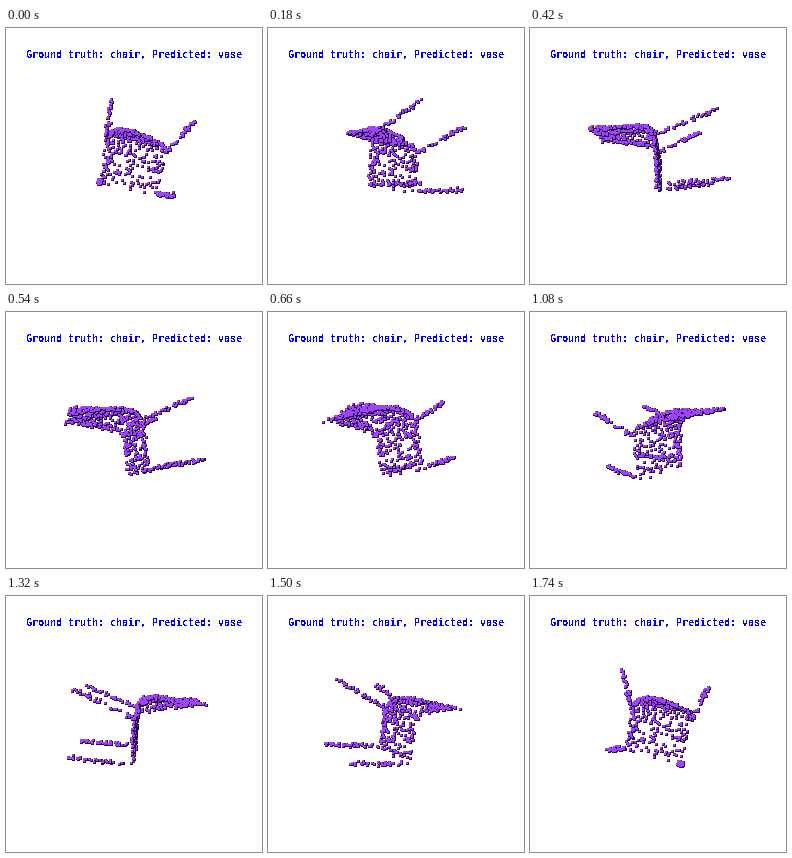
A matplotlib script that plays this animation: 256 by 256 pixels, repeating every 1800 ms.

```python
import numpy as np
import matplotlib.pyplot as plt
from matplotlib.animation import FuncAnimation

SIZE, DPI = 256, 64
FRAMES, LOOP_MS = 30, 1800
FOCAL = SIZE / 2 / np.tan(np.radians(30))  # 60 degree field of view
TILT = np.radians(12)
LENGTH, BEND = 112, 50  # seat front to top of the back, and the fold between
LAYERS = 5
PURPLE, DARK, WHITE = (160, 68, 250), (40, 14, 62), (255, 255, 255)

rng = np.random.default_rng(7)


def tilted(across, along, z):
    """Chair axes to world axes, y up."""
    c, s = np.cos(TILT), np.sin(TILT)
    return np.column_stack([across * c + along * s, along * c - across * s, z])


def shell(u, v):
    """Seat and back: u from -1 to 1 across, v along the length."""
    fold = 5 * np.log1p(np.exp((v - BEND) / 5))
    z = 0.97 * fold + 0.04 * v - 1
    half = 31.5 - 6 * ((v - BEND) / (LENGTH - BEND)) ** 2
    pts = tilted(u * half - 0.1 * z, v - 33.5 - 0.92 * fold, z + u)
    bulge = 14 * (1 - u * u) * np.sin(np.pi * v / LENGTH) ** 2
    return pts + np.outer(bulge, (-0.55, 0.83, 0.1))


def shell_points(n):
    v = LENGTH * rng.uniform(0, 1, n) ** 0.8
    return shell(rng.uniform(-1, 1, n), v) + rng.normal(0, 0.6, (n, 3))


def leg_pair(v, spread, along, z, n=45):
    """Left and right leg, splayed from the shell edge at v to the feet."""
    side = np.repeat([-1, 1], n)
    joint = shell(side, np.full(2 * n, v))
    foot = tilted(7.5 + side * spread, along, z + 4.5 * side) \
        if np.ndim(along) else tilted(7.5 + side * spread,
                                      np.full(2 * n, along), z + 4.5 * side)
    t = rng.uniform(0, 1, (2 * n, 1))
    return foot + (joint - foot) * t + rng.normal(0, 1, (2 * n, 3))


cloud = np.vstack([
    shell_points(680),
    leg_pair(47, 33.6, 38.3, -50),
    leg_pair(2, 27.5, -23, -62),
])


def project(angle):
    """Pixel positions after a turn about the vertical axis, far to near."""
    x, y, z = cloud.T
    c, s = np.cos(angle), np.sin(angle)
    depth = z * c + x * s
    scale = FOCAL / (FOCAL + depth)
    xy = np.column_stack([(x * c - z * s) * scale, -y * scale]) + SIZE / 2
    return np.round(xy[np.argsort(-depth)]).astype(int)


def stamp(img, xy, offsets, color):
    for dx in offsets:
        for dy in offsets:
            img[xy[:, 1] + dy, xy[:, 0] + dx] = color


def render(angle):
    img = np.full((SIZE, SIZE, 3), WHITE, np.uint8)
    for xy in np.array_split(project(angle), LAYERS):
        stamp(img, xy, (-1, 0, 1), DARK)
        stamp(img, xy, (-1, 0), PURPLE)
    return img


fig = plt.figure(figsize=(SIZE / DPI, SIZE / DPI), dpi=DPI, facecolor="white")
ax = fig.add_axes([0, 0, 1, 1])
ax.axis("off")
view = ax.imshow(render(0), extent=(0, SIZE, SIZE, 0), interpolation="nearest")
ax.text(20, 30, "Ground truth: chair, Predicted: vase", color="blue",
        family="DejaVu Sans Mono", weight="bold", size=10 * 72 / DPI,
        va="baseline", antialiased=False)


def draw(i):
    view.set_data(render(2 * np.pi * i / FRAMES))
    return [view]


anim = FuncAnimation(fig, draw, frames=FRAMES, interval=LOOP_MS / FRAMES,
                     repeat=True, repeat_delay=0)
plt.show()
```
